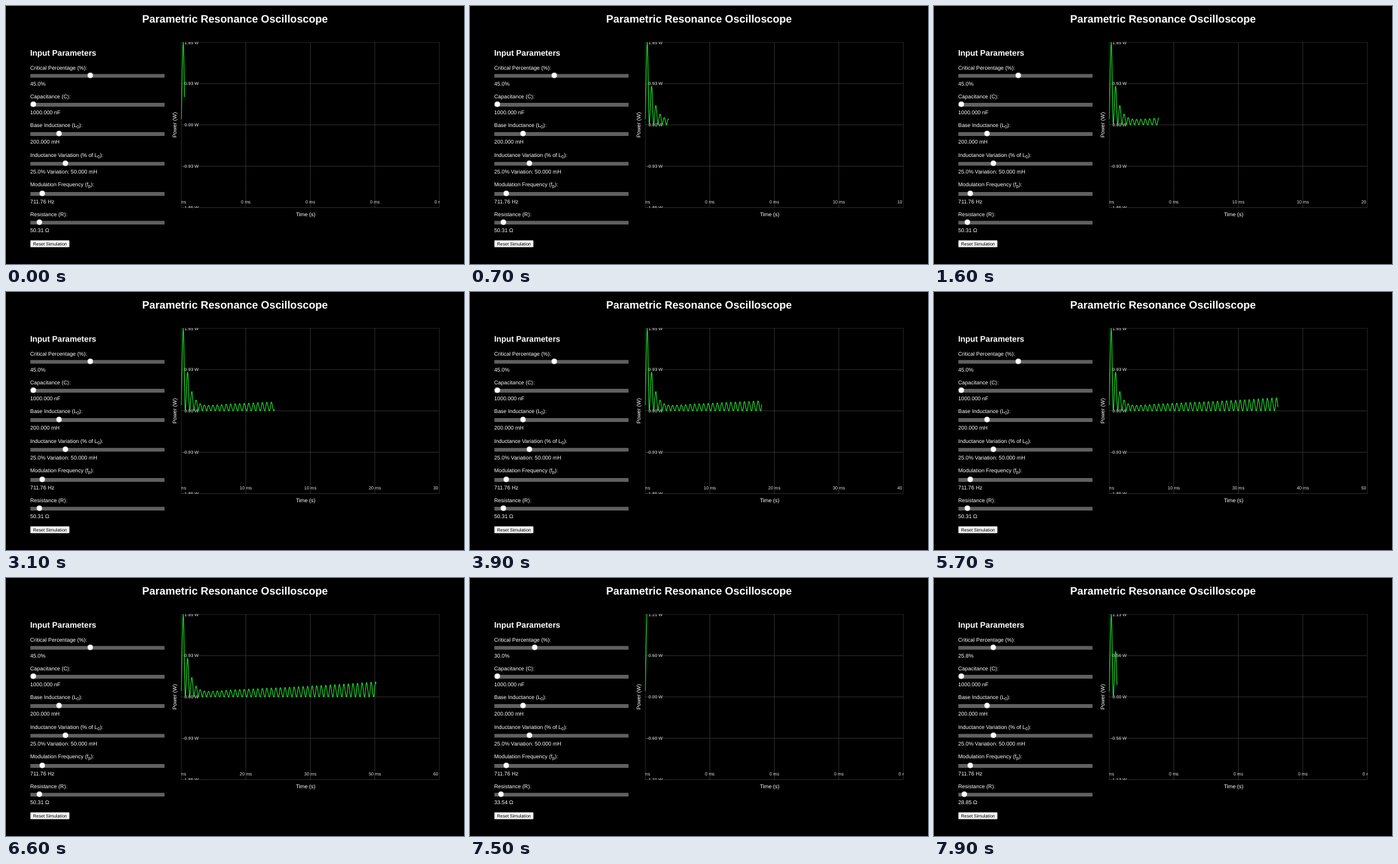
Recreate the animation shown at these times as an HTML page. Size 720 px wide and 405 px high, loop 8 s.

```html
<!DOCTYPE html>
<html lang="en">
<head>
<meta charset="utf-8">
<title>Parametric Resonance Oscilloscope</title>
<style>
html, body { margin: 0; width: 100%; height: 100%; overflow: hidden; background: #000; }
svg { display: block; width: 720px; height: 405px; }
text { font: 8.47px "Liberation Sans", Arial, sans-serif; fill: #fff; text-rendering: geometricPrecision; }
.title { font-size: 16.9px; font-weight: bold; }
.head { font-size: 12.72px; font-weight: bold; }
.sub { font-size: 7.06px; }
.mid { text-anchor: middle; }
.button { font-size: 7.06px; fill: #000; }
.tick { font-size: 7.1px; fill: #ddd; }
.y { text-anchor: end; }
.track { fill: #606060; }
.thumb { fill: #fff; stroke: #ccc; stroke-width: .5; }
.grid { stroke: #666; stroke-width: .9; stroke-dasharray: 1 1; fill: none; }
#trace { stroke: #1ee62c; stroke-width: 1.1; stroke-linejoin: round; fill: none; }
</style>
</head>
<body>
<svg viewBox="0 0 720 405">
  <defs><clipPath id="screen"><rect x="275.2" y="56.5" width="406.6" height="260.5"/></clipPath></defs>
  <rect width="720" height="405"/>
  <text class="title mid" x="360" y="26.2">Parametric Resonance Oscilloscope</text>
  <text class="head" x="38" y="78.4">Input Parameters</text>
  <g id="panel"></g>
  <rect x="38.4" y="367.9" width="61.2" height="10.6" rx="1" fill="#f2f2f2" stroke="#999" stroke-width=".6"/>
  <text class="button mid" x="69.1" y="375.6">Reset Simulation</text>
  <text class="mid" transform="translate(268 186.6) rotate(-90)">Power (W)</text>
  <text class="mid" x="471" y="330.3">Time (s)</text>
  <g id="chart" clip-path="url(#screen)"></g>
</svg>
<script>
const LOOP = 8000, FRAME = 100;
const LEFT = 275.5, TOP = 57, WIDTH = 405.8, HEIGHT = 259.4, MID = TOP + HEIGHT / 2;
const DX = WIDTH / 800, DT = 1e-4;
const L0 = 0.2, C = 1e-6, DEPTH = 0.25;
const PUMP = 2 / Math.sqrt(L0 * C);
const CRITICAL_R = DEPTH * Math.sqrt(L0 / C);

function add(parent, tag, attrs, content = '') {
  const el = document.createElementNS('http://www.w3.org/2000/svg', tag);
  for (const key in attrs) el.setAttribute(key, attrs[key]);
  el.innerHTML = content;
  return parent.appendChild(el);
}

const sub = s => `<tspan class="sub" dy="2">${s}</tspan><tspan dy="-2">`;
// label, value, thumb x, then centres of label, track and value
const controls = [
  ['Critical Percentage (%):', '', 132.5, 97, 109.7, 121.5],
  ['Capacitance (C):', '1000.000 nF', 43, 142, 155, 167],
  [`Base Inductance (L${sub(0)}):</tspan>`, '200.000 mH', 83.4, 187, 201, 213.4],
  [`Inductance Variation (% of L${sub(0)}):</tspan>`, '25.0% Variation: 50.000 mH', 93.4, 233.8, 247.7, 260],
  [`Modulation Frequency (f${sub('p')}):</tspan>`, '711.76 Hz', 57, 280.3, 295, 307],
  ['Resistance (R):', '', 52.5, 327.3, 340.2, 352.2]
];
const panel = document.getElementById('panel');
const rows = controls.map(([label, value, x, labelY, trackY, valueY]) => {
  add(panel, 'text', { x: 38, y: labelY + 3 }, label);
  add(panel, 'rect', { class: 'track', x: 38.3, y: trackY - 2.9, width: 211, height: 5.8, rx: .6 });
  return {
    thumb: add(panel, 'circle', { class: 'thumb', cx: x, cy: trackY - .8, r: 4.1 }),
    value: add(panel, 'text', { x: 38, y: valueY + 3 }, value)
  };
});
const critRow = rows[0], resistRow = rows[5];

const chart = document.getElementById('chart');
const quarters = [0, 1, 2, 3, 4];
const gridX = i => LEFT + WIDTH * i / 4;
const gridY = i => TOP + HEIGHT * i / 4;
for (const i of quarters) {
  add(chart, 'path', { class: 'grid', d: `M${gridX(i)} ${TOP}v${HEIGHT}` });
  add(chart, 'path', { class: 'grid', d: `M${LEFT} ${gridY(i)}h${WIDTH}` });
}
const timeTicks = quarters.map(i => add(chart, 'text', { class: 'tick mid', x: gridX(i), y: 310.4 }));
const powerTicks = quarters.map(i => add(chart, 'text', { class: 'tick y', x: 303, y: gridY(i) + 2.5 }));
const trace = add(chart, 'path', { id: 'trace' });

// Series RLC with a pumped inductance, started from a capacitor at 100 V.
function simulate(count, R) {
  let current = 0, volts = 100;
  return Array.from({ length: count }, (_, n) => {
    const L = L0 * (1 + DEPTH * Math.sin(PUMP * n * DT));
    current += (volts - R * current) / L * DT;
    volts -= current / C * DT;
    return current * current * R;
  });
}

function stateAt(t) {
  if (t < 7300) return { crit: 45, count: 11 + Math.floor(t * 0.09) };
  if (t < 7700) return { crit: [41, 35.4, 30, 25.8][(t - 7300) / FRAME], count: 6 };
  return { crit: 25.8, count: 1 + Math.floor((t - 7625) * 0.09) };
}

function draw(t) {
  const { crit, count } = stateAt(t);
  const R = CRITICAL_R * crit / 100;
  const power = simulate(count, R);
  const peak = Math.max(...power);
  trace.setAttribute('d', 'M' + power.map((p, i) =>
    `${(LEFT + i * DX).toFixed(2)} ${(MID - p / peak * HEIGHT / 2).toFixed(2)}`).join('L'));

  quarters.forEach(i => {
    const seconds = count * DT * i / 4;
    timeTicks[i].textContent = Math.round(seconds * 100) * 10 + ' ms';
    powerTicks[i].textContent = (peak * (2 - i) / 2).toFixed(2) + ' W';
  });
  critRow.thumb.setAttribute('cx', 132.5 - (45 - crit) * 2.05);
  critRow.value.textContent = crit.toFixed(1) + '%';
  resistRow.thumb.setAttribute('cx', 52.5 - (45 - crit) * 0.25);
  resistRow.value.textContent = R.toFixed(2) + ' Ω';
}

const start = performance.now();
let shown = -1;
function tick() {
  const elapsed = Math.max(0, performance.now() - start) % LOOP;
  const t = Math.floor(elapsed / FRAME) * FRAME;
  if (t !== shown) draw(shown = t);
  requestAnimationFrame(tick);
}
tick();
</script>
</body>
</html>
```
